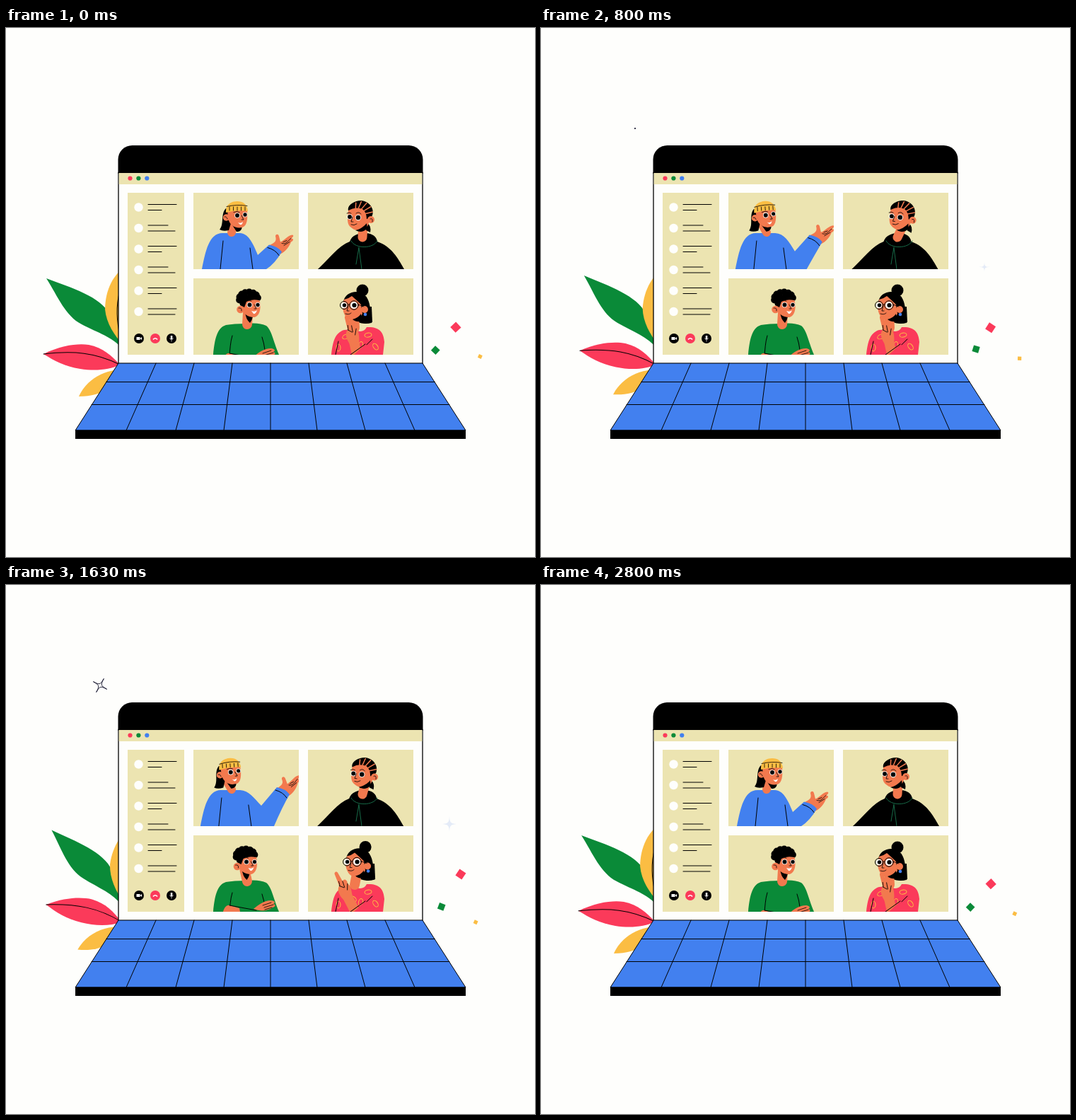
Write an HTML page that moves like this. It is 748 px wide and 748 px high and loops after 2830 ms.

```html
<!DOCTYPE html>
<html lang="en">
<head>
<meta charset="utf-8">
<title>Video call</title>
<style>
html, body { margin: 0; width: 100%; height: 100%; overflow: hidden; background: #fefefc; }
svg { display: block; width: 100vw; height: 100vh; }
.beige { fill: #ece4b1; } .red { fill: #fb3a5a; } .green { fill: #0a8a38; }
.blue { fill: #4280ef; } .yellow { fill: #fbbd43; } .skin { fill: #f2794e; } .white { fill: #fefefc; }
.ln { fill: none; stroke: #000; stroke-linecap: round; }
.thin { fill: none; stroke: #000; stroke-width: .8; stroke-linecap: round; }
.neck { stroke: #f2794e; stroke-linecap: round; }
</style>
</head>
<body>
<svg id="stage" viewBox="0 0 748 748"></svg>
<script>
const LOOP = 2830;

// Motion helpers: one swing per loop, and a pose that eases in, holds and eases out.
const wave = (mid, amp, peak) => t => mid + amp * Math.cos((t - peak) / LOOP * 2 * Math.PI);
function ease(t, from, to) {
  const u = Math.min(1, Math.max(0, (t - from) / (to - from)));
  return u * u * (3 - 2 * u);
}
const hold = (t, inFrom, inTo, outFrom, outTo) => ease(t, inFrom, inTo) - ease(t, outFrom, outTo);

// Markup helpers
const range = (n, f) => Array.from({ length: n }, (_, i) => f(i)).join('');
const path = (cls, d, extra = '') => `<path class="${cls}" d="${d}" ${extra}/>`;
const dot = (cls, x, y, r) => `<circle class="${cls}" cx="${x}" cy="${y}" r="${r}"/>`;
const rect = (cls, x, y, w, h) => `<rect class="${cls}" x="${x}" y="${y}" width="${w}" height="${h}"/>`;
const group = (id, body) => `<g id="${id}">${body}</g>`;
const eye = (x, y, r = 3.8) => dot('white', x, y, r) + dot('', x, y, r * .78);
const neck = (id, x, y, width) => `<line id="${id}" class="neck" x1="${x}" y1="${y}" stroke-width="${width}"/>`;
const square = (id, cls, size) => group(id, rect(cls, -size / 2, -size / 2, size, size));

function tile(person, i) {
  const box = rect('beige', 265 + 162 * (i % 2), 233 + 121 * (i >> 1), 149, 108);
  return `${box}<clipPath id="tile${i}">${box}</clipPath><g clip-path="url(#tile${i})">${person}</g>`;
}

const leaves =
  group('leafGreen', path('green', 'M57 354C92 367 134 380 146 404C153 417 158 434 164 453C151 437 130 431 107 419C84 407 74 381 57 354Z')) +
  group('leafGold', path('yellow', 'M174 334C151 346 140 372 140 398C142 418 153 434 166 449L184 449V334Z') +
    path('ln', 'M163 365C156 385 155 405 160 430')) +
  group('leafRed', path('red', 'M53 461C80 448 102 446 117 448C137 452 149 463 161 476C146 484 124 485 105 482C82 478 69 471 53 461Z') +
    path('ln', 'M53 461C96 456 127 459 161 476')) +
  group('leafLow', path('yellow', 'M103 521C111 503 127 491 144 486L161 482L155 497C143 515 126 521 103 521Z'));

const keyboard = path('blue', 'M159 474H589L650 569H98Z', 'stroke="#000"') +
  path('ln', 'M142 500.5H606M121 532.5H627' + range(7, i => {
    const k = i - 3;
    return `M${374 + 54 * k} 474L${374 + k * (65 + Math.abs(k))} 569`;
  })) + rect('', 98, 568.5, 552, 12.5);

const contact = i => {
  const y = 253.5 + 29.5 * i;
  return dot('white', 187.5, y, 6.2) +
    path('ln', `M201 ${y - 4}h${i % 2 && i < 5 ? 28 : 40}M201 ${y + 4}h${i % 2 ? 38 : 19}`);
};
const sidebar = rect('beige', 172, 233, 80, 229) + range(6, contact) +
  dot('', 188, 439, 7) + dot('red', 211, 439, 7) + dot('', 234, 439, 7) +
  path('white', 'M184.5 437h5v4h-5zM190 438.5l2-1.5v4l-2-1.5z') +
  path('', 'M208 440.5q3-3.5 6 0', 'fill="none" stroke="#fff" stroke-width="1.7"') +
  rect('white', 232.8, 435, 2.5, 5) +
  path('', 'M231.5 438.5q2.5 5 5 0M234 441.5v2', 'fill="none" stroke="#fff" stroke-width=".7"');

const speaker =
  group('speakerHand', path('skin', 'M-9-4C-1-8 2-10 0-17C0-20 4-21 5-17L7-9C14-12 17-18 24-19C27-18 24-15 22-14C26-14 26-11 22-9C20-3 14 5 7 8Z') +
    path('thin', 'M9-7C15-5 17-10 22-14M12-4L20-9M11-9L16-11')) +
  '<path id="speakerBody" class="blue"/><path id="speakerLines" class="ln"/>' +
  neck('speakerNeck', 319, 289, 12) +
  group('speakerHead',
    path('', 'M311 255C303 263 309 277 302 285Q307 288 315 286L322 263Z') +
    path('', 'M317 274L334 280Q333 289 326 288Z') +
    path('skin', 'M313 258H341C342 269 341 280 334 282C324 284 316 279 314 269Z') +
    dot('skin', 311.5, 268, 4.7) + path('thin', 'M309 267Q312 266 313 270') +
    eye(327, 265) + eye(338, 264, 3.4) +
    path('thin', 'M333 265l3 6h-3M322 260.5q4-2 8 0') +
    path('white', 'M328 275q4 2 7-1q-1 5-4 4Z') +
    path('yellow', 'M311 261C310 249 319 245 327 245C336 245 341 250 342 259Q327 257 311 261Z') +
    path('thin', 'M312 252.5Q327 249 341 251.5' + range(5, i => `M${316 + 5.5 * i} 253v5`)));

// Each braid runs from the hairline out to the rim of the head.
const braid = i => {
  const a = (27 * i - 115) * Math.PI / 180;
  return `M${498 + 9 * Math.cos(a)} ${264 + 9 * Math.sin(a)}L${502 + 17 * Math.cos(a)} ${262 + 17 * Math.sin(a)}`;
};
const hoodie =
  group('hoodieBody',
    path('', 'M441 341C457 326 470 308 486 302C489 293 498 290 507 290C518 290 524 295 525 302C545 309 554 325 563 341Z')) +
  neck('hoodieNeck', 504, 296, 13) +
  path('ln', 'M488 301C494 313 520 312 525 301M499 310L495 334M499 311L503 341', 'style="stroke:#176a48"') +
  group('hoodieHead',
    path('', 'M511 276q6 4 4 13l-6-3z') +
    path('skin', 'M484 258C486 249 497 246 507 250C516 256 517 272 510 282C502 289 491 287 485 279C482 274 483 266 484 258Z') +
    path('', 'M484 258C482 251 492 244 502 244C514 245 521 255 518 265Q515 270 510 270Q510 261 504 256Q494 252 484 258Z') +
    path('', range(5, braid), 'fill="none" stroke="#f2794e" stroke-width="1.5"') +
    path('', 'M494 286C500 285 506 281 510 276L511 283C506 289 500 289 494 286Z') +
    dot('skin', 516, 271, 5) + path('thin', 'M515 270q4-2 3 4') +
    group('eyesOpen', eye(486, 267) + eye(498, 268, 4.2)) +
    path('ln', 'M483 268q3 3 6 0M494 269q4 3 8 0', 'id="eyesShut"') +
    path('thin', 'M490 267l-2 7h3M482 262q3-2 6 0M495 262q4-3 7 1M488 278q4 2 8-1'));

const curl = i => {
  const a = Math.PI * (1.05 - i / 7);
  return dot('', 343 + 13 * Math.cos(a), 383 - 9.5 * Math.sin(a), 5);
};
const sweater =
  path('green', 'M293 462C295 441 298 424 311 420Q322 418 340 418Q358 416 368 421C376 428 377 440 386 462Z') +
  path('ln', 'M320 435C317 445 317 454 316 462M362 437Q365 446 366 455') +
  group('crossed',
    path('green', 'M320 466L333 457L357 463L375 466Z') +
    path('skin', 'M306 474C307 464 312 459 316 460L330 464L332 474Z') +
    path('ln', 'M316 460L354 467') +
    path('skin', 'M350 465C358 458 366 453 374 453C379 453 382 456 378 458C382 459 381 462 377 463C370 468 360 469 350 465Z') +
    path('thin', 'M363 460l12-4M365 463l13-4M366 466l10-3')) +
  neck('sweaterNeck', 341, 419, 14) +
  group('sweaterHead',
    range(8, curl) +
    path('', 'M338 401L349 408Q348 413 345 417Q339 412 338 401Z') +
    path('skin', 'M334 384H358C361 393 360 407 351 409C341 409 334 403 333 394Z') +
    path('', 'M328 378H358L358 385Q347 383 340 387L337 395L331 392Z') +
    dot('skin', 331.5, 398, 5.3) + path('thin', 'M329 396q5-1 4 4') +
    eye(344.5, 391.5) + eye(356, 391.5, 3.4) +
    path('thin', 'M351 391l3 6h-3M340 386q4-2 7 0') +
    path('white', 'M347 400q5 2 8-1q-2 6-5 5Z'));

const seed = i => {
  const x = 470 + 10.5 * i, y = 443 + 9 * Math.cos(2.4 * i);
  return `<ellipse cx="${x}" cy="${y}" rx="3" ry="5" fill="none" stroke="#fbbd43" transform="rotate(${65 * i} ${x} ${y})"/>`;
};
const lens = (x, r) => dot('white', x, 392, r - 1.2) + dot('', x + .5, 392, r / 2) + dot('ln', x, 392, r);
const thinker =
  path('', 'M495 395L517 394L518 416Q509 420 497 416Z', 'id="thinkerHair"') +
  path('red', 'M460 462C462 444 465 431 478 427L490 426Q505 433 510 423C528 422 534 430 535 444L533 462Z') +
  range(6, seed) + path('ln', 'M470 443L466 462M518 440Q509 450 497 458') +
  neck('thinkerNeck', 493, 424, 14) +
  group('thinkerHead',
    dot('', 504, 371, 8.5) +
    path('', 'M477 388C478 377 488 372 498 373C512 375 515 390 516 406L517 417Q507 419 501 416L490 388Z') +
    path('skin', 'M478 384Q484 383 489 379Q497 386 502 391L504 404C499 413 488 415 482 410C477 405 474 394 478 384Z') +
    path('', 'M490 412Q498 410 502 404L502 415Q495 416 490 412Z') +
    dot('skin', 507, 398, 5) + dot('blue', 508, 405, 2.3) +
    lens(478, 5.5) + lens(492, 6.2) +
    path('thin', 'M483.5 391h2.3M498 391l8 3M484 393l-2 7h3M480 404q5 2 8-1')) +
  '<line id="thinkerArm" class="neck" stroke-width="14"/>' +
  group('thinkerHand',
    path('skin', 'M-7 6C-10-3-9-11-4-14L-3-31C-3-35 2-35 2-31L3-18C7-21 10-17 8-12C11-9 9 0 7 6Z') +
    path('thin', 'M-4-14L1-9M3-18L2-9M8-12L4-4M-2-20L-3-14')) +
  path('red', 'M488 466L508 447L520 456V466Z') + path('ln', 'M487 462L508 447');

const starShape = 'M0-1C0-.1 .1 0 1 0C.1 0 0 .1 0 1C0 .1-.1 0-1 0C-.1 0 0-.1 0-1Z';

document.getElementById('stage').innerHTML =
  rect('white', 0, 0, 748, 748) + leaves +
  path('', 'M158.5 206V186A20 20 0 0 1 178.5 166H569.5A20 20 0 0 1 589.5 186V206Z') +
  '<rect class="white" x="159" y="204.5" width="430" height="270" stroke="#000" stroke-width="1.3"/>' +
  rect('beige', 159.7, 205, 428.6, 16) +
  ['red', 'green', 'blue'].map((cls, i) => dot(cls, 175.5 + 11.9 * i, 212.5, 3.1)).join('') +
  sidebar + [speaker, hoodie, sweater, thinker].map(tile).join('') + keyboard +
  square('chipRed', 'red', 10.8) + square('chipGreen', 'green', 9) + square('chipGold', 'yellow', 5.2) +
  path('white', starShape, 'id="lineStar" stroke="#181830" vector-effect="non-scaling-stroke"') +
  path('', starShape, 'id="blueStar" fill="#4678df"');

const node = Object.fromEntries([...document.querySelectorAll('[id]')].map(e => [e.id, e]));
const set = (id, attrs) => { for (const k in attrs) node[id].setAttribute(k, attrs[k]); };
const show = (id, on) => set(id, { visibility: on ? 'visible' : 'hidden' });
const move = (id, x, y, angle = 0, scale = 1) =>
  set(id, { transform: `translate(${x} ${y}) rotate(${angle}) scale(${scale})` });
const turn = (id, angle, x, y, dx = 0) =>
  set(id, { transform: `translate(${dx} 0) rotate(${angle} ${x} ${y})` });

// Position and angle swing independently.
const chips = {
  chipRed: [wave(638.7, -4.7, 420), wave(417.5, 9.5, 420), wave(39, 9, 2600)],
  chipGreen: [wave(612.2, 5.3, 1250), wave(455, -1, 1000), wave(29, -17, 1150)],
  chipGold: [wave(669, -8.2, 2050), wave(470, 6.8, 1700), wave(20, -18, 800)],
};
const sway = wave(2.2, -2.2, 80);

function drawLeaves(t) {
  const angle = sway(t);
  turn('leafGreen', angle, 160, 449);
  turn('leafGold', angle * 1.75, 166, 450);
  turn('leafRed', angle * 1.15, 160, 500);
  turn('leafLow', angle * 1.25, 160, 500);
}

function drawStars(t) {
  // Two bursts of pulses; the star turns as it grows and shrinks.
  const phase = t < 1905 ? (t - 445) / 365 : (t - 2030) / 320;
  const turnBack = 1 - 2 * (phase % 1), radius = 22 * (1 - Math.abs(turnBack));
  move('lineStar', 133, 142, turnBack * 58, radius);
  show('lineStar', phase > 0 && t < 2670 && radius > .4);

  const flash = hold(t, 1650, 2000, 2060, 2200);
  move('blueStar', 627, 338, 15 * flash, 14 * hold(t, 540, 1000, 1950, 2250));
  set('blueStar', { opacity: .14 + .72 * flash });
}

function drawSpeaker(t) {
  const lean = hold(t, 100, 500, 1700, 2000), raise = hold(t, 550, 1000, 1650, 2000);
  const dx = -8.5 * lean, b = dx / 4;
  const ex = 356 + 5 * raise, ey = 321 - 9 * raise;
  const wx = 381 + 3 * lean + 8 * raise, wy = 311.5 - 4.5 * lean - 16 * raise;
  set('speakerBody', { d: `M${277 + b} 341C${282 + b} 316 ${287 + b} 290 ${306 + b} 290L331 290C${342 - b} 291 ${348 - b} 301 ${ex} ${ey}` +
    `L${wx - 9} ${wy - 5}Q${wx + 3} ${wy - 3} ${wx + 9} ${wy + 5}Q${wx - 1} ${wy + 22} ${wx - 13} 341Z` });
  set('speakerLines', { d: `M${307 + b} 301L${303 + b} 341M${345 + b} 311L${349 + b} 341M${wx - 11} ${wy - 1}Q${wx} ${wy + 2} ${wx + 5} ${wy + 10}` });
  move('speakerHand', wx, wy, 13 * lean - 20 * raise);
  set('speakerNeck', { x2: 321 + dx, y2: 278 });
  turn('speakerHead', dx / 2, 322, 275, dx);
}

function drawHoodie(t) {
  const dx = 5 * hold(t, 100, 500, 2050, 2270) + 5.5 * hold(t, 150, 500, 700, 1050);
  const shut = t > 1960 && t < 2100;
  move('hoodieBody', -dx / 6, 0);
  set('hoodieNeck', { x2: 505 + dx * .8, y2: 278 });
  turn('hoodieHead', dx / 3, 502, 275, dx);
  show('eyesOpen', !shut);
  show('eyesShut', shut);
}

function drawSweater(t) {
  const shift = hold(t, 1150, 1600, 1800, 2250);
  set('sweaterNeck', { x2: 342 - 4.5 * shift, y2: 403 });
  move('sweaterHead', -4.5 * shift, 0);
  move('crossed', 0, -7 * shift);
}

function drawThinker(t) {
  const point = hold(t, 1300, 1950, 2050, 2350), dx = 8 * point;
  const x = 491 - 20 * point, y = 439 - 5 * point;
  set('thinkerNeck', { x2: 492 + dx, y2: 408 });
  move('thinkerHair', dx, 0);
  move('thinkerHead', dx, -point);
  set('thinkerArm', { x1: 498, y1: 470, x2: x, y2: y });
  move('thinkerHand', x, y, -17 - 30 * point ** 2);
}

function draw(t) {
  for (const id in chips) move(id, ...chips[id].map(f => f(t)));
  for (const part of [drawLeaves, drawStars, drawSpeaker, drawHoodie, drawSweater, drawThinker]) part(t);
}

const start = performance.now();
function tick() {
  draw((performance.now() - start) % LOOP);
  requestAnimationFrame(tick);
}
tick();
</script>
</body>
</html>
```
